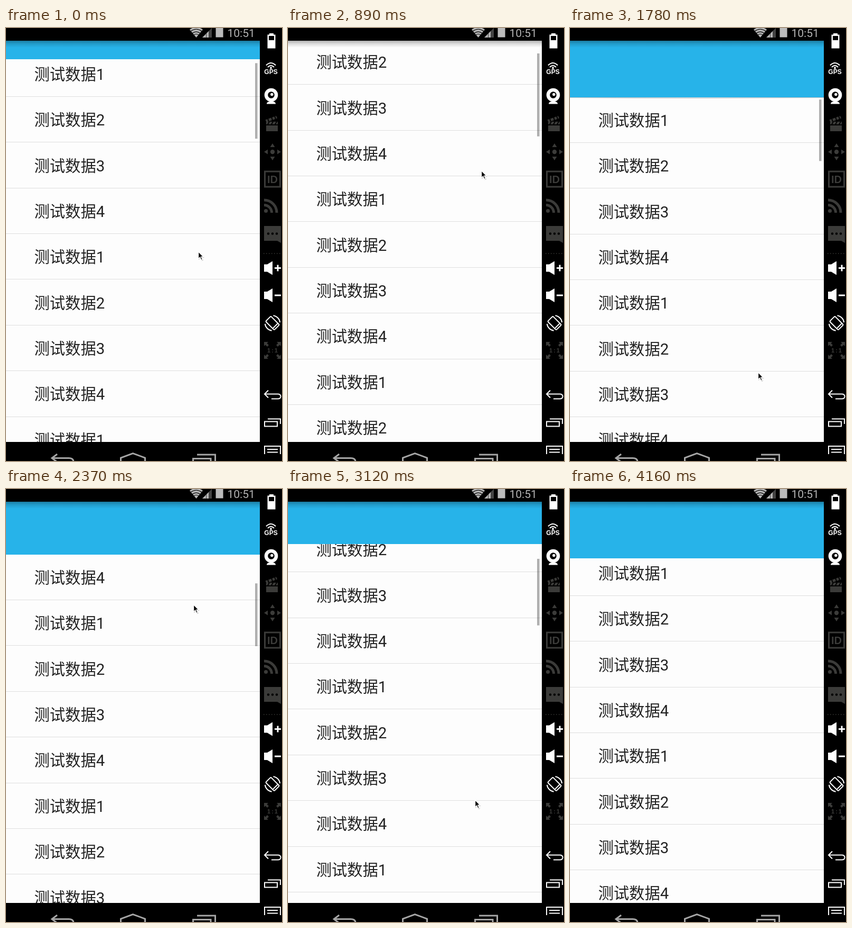
Animation of 523 by 818 pixels, one loop 4910 ms. Source, as an HTML page:

```html
<!DOCTYPE html>
<html lang="zh-CN">
<head>
<meta charset="utf-8">
<title>List with sliding header</title>
<style>
html, body { margin: 0; width: 100%; height: 100%; overflow: hidden; background: #000; }
svg { display: block; }
.row { font: 29.3px Roboto, "Noto Sans CJK SC", sans-serif; fill: #222; }
.clock { font: 21px Roboto, sans-serif; fill: #b4b4b4; }
.tag { font-family: "Liberation Sans", Arial, sans-serif; font-weight: bold; text-anchor: middle; }
.line { fill: none; stroke: #fff; stroke-width: 2; }
.nav { fill: none; stroke: #a6a6a6; stroke-width: 3; }
.dim { fill: #3b3b39; }
.dimline { fill: none; stroke: #3b3b39; }
</style>
</head>
<body>
<svg width="523" height="818" viewBox="0 0 523 818">
  <defs>
    <linearGradient id="shade" x2="0" y2="1">
      <stop offset="0" stop-color="#000" stop-opacity=".3"/>
      <stop offset=".45" stop-color="#000" stop-opacity=".13"/>
      <stop offset="1" stop-color="#000" stop-opacity="0"/>
    </linearGradient>
    <path id="speaker" d="M489 -7H495L505 -13V13L495 7H489Z"/>
    <path id="corner" d="M0 0H8L5.5 2.5L9 6L6 9L2.5 5.5L0 8Z"/>
  </defs>

  <rect width="481" height="782" y="24" fill="#27b3e9"/>
  <svg id="list" width="481" height="700">
    <rect width="481" height="782" fill="#fdfdfd"/>
    <g id="rows"></g>
    <path id="glow" d="M0 .3Q240 2 481 .3" fill="none" stroke="#b2b6b8" stroke-width="1.5"/>
  </svg>
  <rect id="bar" x="472" width="4.500" fill="#000" fill-opacity=".31"/>
  <rect y="24" width="481" height="13" fill="url(#shade)"/>
  <g id="pointer">
    <path d="M1 2V16L4.500 13L7 18L10 17L8 12H12Z" fill="#000" opacity=".2"/>
    <path d="M.5 .5V14L3.700 11.200L5.900 16.400L8.300 15.400L6.100 10.300H10.200Z" stroke="#fff" stroke-width="1.400"/>
  </g>

  <rect width="481" height="24"/>
  <rect y="782" width="481" height="36"/>
  <rect x="481" width="42" height="818"/>

  <!-- status bar -->
  <path d="M348 3Q360.500 -6 373 3L360.500 18Z" fill="#b4b4b4"/>
  <path d="M350 6Q360.500 -1.500 371 6M353 9.800Q360.500 4.500 368 9.800M356 13Q360.500 10 365 13" fill="none" stroke="#000" stroke-width="1.200"/>
  <path d="M390 0V18H372Z" fill="#444"/>
  <path d="M379 11V18H372ZM380 10L384 6V18H380Z" fill="#b4b4b4"/>
  <rect x="397.500" width="14" height="17.500" fill="#bcbcbc"/>
  <text class="clock" x="419.500" y="16.500">10:51</text>

  <!-- navigation bar -->
  <g class="nav">
    <path d="M97 805L87 812.500L97 820M87 812.500H119Q128 812.500 128 820"/>
    <path d="M217.500 820V812L240.500 803.500L263.500 812V820"/>
    <path d="M362 806H396.500V820M354.500 820V813.500H388V820"/>
  </g>

  <!-- tool strip -->
  <path d="M499 10H507V12.500H510.500V38.500H495.500V12.500H499Z" fill="#fff"/>
  <rect x="498" y="15" width="10" height="8"/>
  <path class="line" d="M493 70.500Q502 61.500 511 70.500M496 74Q502 68 508 74"/>
  <circle cx="502" cy="75.500" r="2" fill="#fff"/>
  <text class="tag" x="502" y="87" font-size="12" fill="#fff">GPS</text>
  <g fill="#fff">
    <circle cx="502.500" cy="126.500" r="12.800"/>
    <path d="M494 143.500Q494 139.500 499 139H506Q511 139.500 511 143.500Z"/>
  </g>
  <circle cx="502.500" cy="126.500" r="6.300"/>
  <circle cx="503.800" cy="125.500" r="2.700" fill="#fff"/>

  <g class="dim">
    <path d="M493 184H515V195H493ZM493 177H515V182H493Z"/>
    <path d="M491.500 173.500L512 166L514 170.500L493.500 178Z"/>
  </g>
  <path d="M496 182L499 177M503 182L506 177M510 182L513 177M498 177L496 171M505 174.500L503 168M511 172L509 166" stroke="#000" stroke-width="2"/>
  <g class="dim">
    <circle cx="505" cy="234" r="4.200"/>
    <path d="M505 218L509.500 225H500.500ZM505 250L509.500 243H500.500ZM489 234L496 229.500V238.500ZM521 234L514 229.500V238.500Z"/>
  </g>
  <rect class="dimline" x="490.500" y="271" width="29" height="29" stroke-width="3"/>
  <text class="tag dim" x="505" y="293" font-size="20">ID</text>
  <path class="dimline" d="M489 334.500A14.500 14.500 0 0 1 503.500 349M489 325A24 24 0 0 1 513 349" stroke-width="5"/>
  <circle class="dim" cx="492.500" cy="345.500" r="3.600"/>
  <path class="dim" d="M489 374H521V406L514 402H489Z"/>
  <path d="M497 388.500h.01M505 388.500h.01M513 388.500h.01" stroke="#000" stroke-width="4.500" stroke-linecap="round"/>
  <path d="M488 426H521" stroke="#3b3b39" stroke-width="1.500" stroke-dasharray="1.500 3.500"/>

  <g fill="#fff">
    <use href="#speaker" y="453.500"/>
    <use href="#speaker" y="505"/>
    <path d="M509 452H513.500V447.500H516.500V452H521V455H516.500V459.500H513.500V455H509ZM509 503.500H521V506.500H509Z"/>
  </g>
  <g class="line" transform="translate(505 557.500) rotate(-45)">
    <rect x="-7" y="-11.500" width="14" height="23" rx="2"/>
    <path d="M-6 7.500H6M-11 -9A14.500 14.500 0 0 0 -11 9M11 9A14.500 14.500 0 0 0 11 -9"/>
  </g>
  <g class="dim">
    <use href="#corner" transform="translate(489 593)"/>
    <use href="#corner" transform="translate(521 593) scale(-1 1)"/>
    <use href="#corner" transform="translate(489 625) scale(1 -1)"/>
    <use href="#corner" transform="translate(521 625) scale(-1 -1)"/>
    <text class="tag" x="506" y="613" font-size="11" letter-spacing="2">1:1</text>
  </g>
  <g class="line">
    <path d="M497 684.500L490 691.500L497 698.500M490 691.500H515Q520.500 691.500 520.500 696Q520.500 700.500 515 700.500H503"/>
    <path d="M496 738.500H520V748M490 743.500H514V752.500H490Z"/>
    <path d="M490 805V790H520V805M495 796H515M495 801.500H515"/>
  </g>
</svg>
<script>
const LOOP = 4910, STEP = 148.1, LAST = 28;
const PITCH = 86.35, TOP = 24, OPEN = 131, BOTTOM = 782;
const $ = id => document.getElementById(id);
const set = (el, attrs) => {
  for (const k in attrs) el.setAttribute(k, attrs[k]);
};
const clamp = (v, lo, hi) => Math.min(hi, Math.max(lo, v));
const ease = f => (1 - Math.cos(Math.PI * f)) / 2;

// turning points of the pointer: step, x, y
const TURNS = [
  [0, 365, 422], [3, 365, 524], [8, 368, 135], [12, 357, 650],
  [15, 356, 119], [18.5, 356, 645], [20, 355, 566], [23, 354, 650]
];
// drags of the content: end step, distance
const DRAGS = [
  [2, 89], [4, 0], [8, -394], [12, 393],
  [15, -366], [18, 300], [19.78, -160], [23, 211]
];

$("rows").innerHTML = Array.from({ length: 14 }, (_, i) => {
  const y = i * PITCH;
  return `<text class="row" x="53.5" y="${y + 55}">测试数据${i % 4 + 1}</text>` +
    `<rect y="${Math.round(y + PITCH - .3)}" width="481" height="1" fill="#dedede"/>`;
}).join("");

function pointerAt(n) {
  const i = TURNS.findIndex(k => k[0] > n);
  if (i < 0) return TURNS.at(-1).slice(1);
  const [s, x, y] = TURNS[i - 1], [e, x2, y2] = TURNS[i];
  const f = ease((n - s) / (e - s));
  return [x + (x2 - x) * f, y + (y2 - y) * f];
}

// The header takes up each drag first, the list scrolls by the rest.
function listAt(n) {
  let top = 59, scroll = 16, from = 0;
  for (const [to, dist] of DRAGS) {
    const move = dist * clamp((n - from) / (to - from), 0, 1);
    const next = clamp(top + move, TOP, OPEN);
    scroll = Math.max(0, scroll - (move - (next - top)));
    top = next;
    from = to;
  }
  return [Math.round(top), Math.round(scroll)];
}

function draw(t) {
  const n = Math.floor(t / STEP);
  const [x, y] = pointerAt(n);
  const [top, scroll] = listAt(n);
  const view = BOTTOM - top;
  const fadeEnd = n <= 4 ? 4 : LAST;
  set($("list"), { y: top, height: view });
  set($("rows"), { transform: `translate(0 ${-scroll})` });
  set($("glow"), { opacity: top === OPEN && scroll <= 1 ? .8 : 0 });
  set($("bar"), {
    y: top + 4 + scroll * view / 3400,
    height: view * view / 3715 + 2,
    opacity: clamp((fadeEnd - n) / 3, 0, 1)
  });
  set($("pointer"), {
    transform: `translate(${Math.round(x) - 1} ${Math.round(y)})`,
    visibility: n < LAST ? "visible" : "hidden"
  });
}

let start;
function tick(now) {
  start ??= now;
  draw((now - start) % LOOP);
  requestAnimationFrame(tick);
}
draw(0);
requestAnimationFrame(tick);
</script>
</body>
</html>
```
